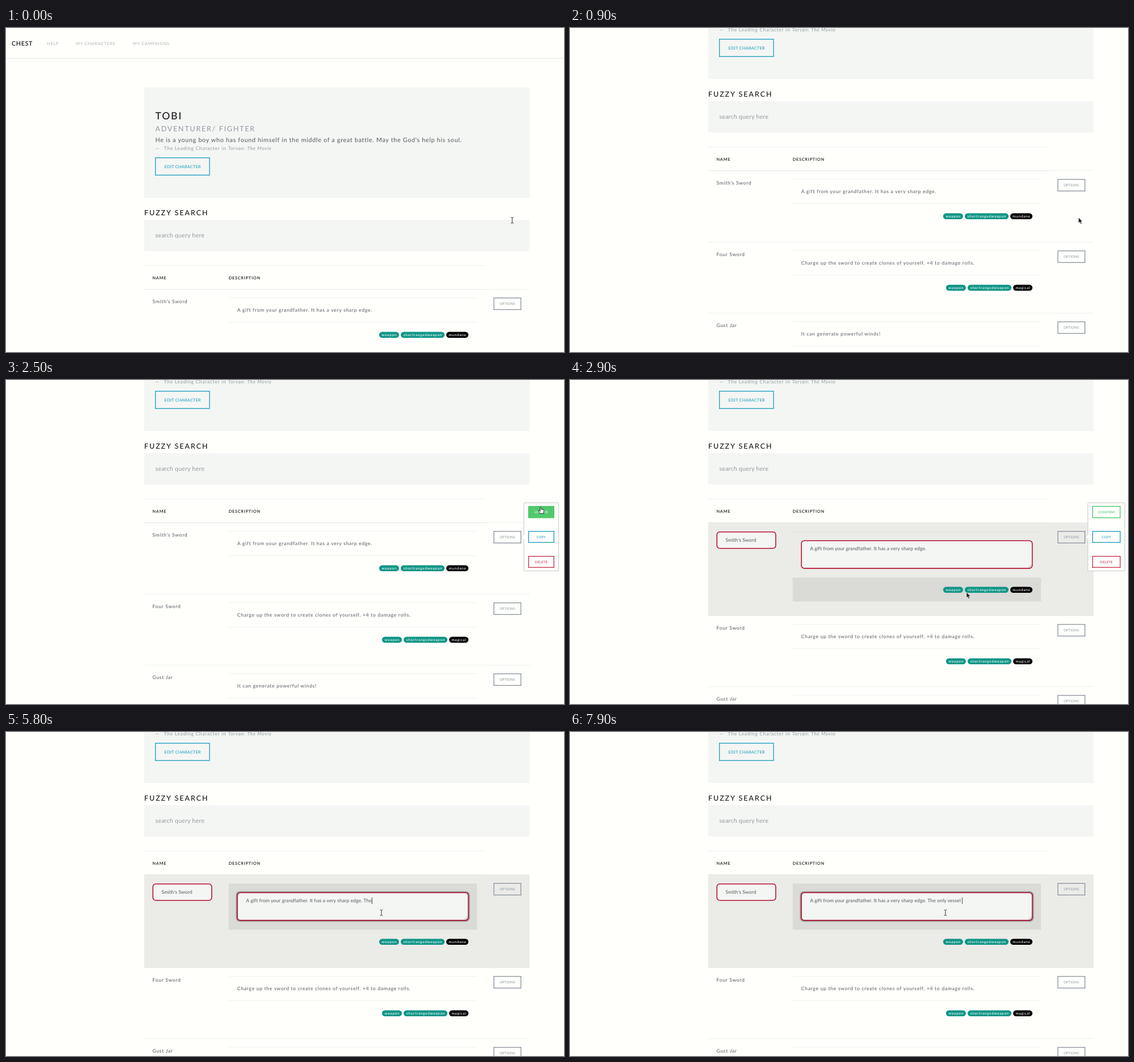
Recreate the animation shown at these times as an HTML page. Size 981x571 px, loop 8 s.

```html
<!DOCTYPE html>
<html lang="en">
<head>
<meta charset="utf-8">
<title>Character inventory</title>
<style>
  html, body { margin: 0; width: 100%; height: 100%; overflow: hidden; background: #fffffc; }
  svg { display: block; width: 981px; height: 571px; font-family: Lato, "Open Sans", sans-serif; }
  text { white-space: pre; text-rendering: geometricPrecision; fill: #55595c; }
  .brand { font-size: 10.7px; letter-spacing: .7px; font-weight: 600; fill: #1a1a1a; }
  .nav { font-size: 7.4px; letter-spacing: .7px; fill: #b0b1b0; }
  .title { font-size: 17.5px; letter-spacing: 1.83px; font-weight: 500; fill: #1a1a1a; }
  .head { font-size: 12.6px; letter-spacing: 1.87px; font-weight: 500; fill: #1a1a1a; }
  .sub { font-size: 12.6px; letter-spacing: 1.68px; fill: #919aa1; }
  .lead { font-size: 10.8px; letter-spacing: .66px; }
  .foot { font-size: 8.6px; letter-spacing: .67px; fill: #919aa1; }
  .hint { font-size: 10.7px; letter-spacing: .18px; fill: #949b9f; }
  .th { font-size: 7.3px; letter-spacing: .76px; font-weight: 600; fill: #1a1a1a; }
  .td { font-size: 8.6px; letter-spacing: .68px; }
  .input { font-size: 8.6px; letter-spacing: .08px; }
  .tag { font-size: 6.4px; letter-spacing: .7px; font-weight: 500; fill: #fff; text-anchor: middle; }
  .btn { font-size: 7.4px; letter-spacing: .2px; font-weight: 500; }
  .small { font-size: 6px; letter-spacing: .12px; font-weight: 500; text-anchor: middle; }
</style>
</head>
<body>
<svg id="stage" viewBox="0 0 981 571" xmlns="http://www.w3.org/2000/svg"></svg>
<script>
const stage = document.getElementById('stage');
const PANEL = '#f4f6f4', LINE = '#f0f1ef', GRAY = '#919aa1', TEAL = '#0f9587';
const BLUE = '#27a3c0', GREEN = '#50c96d', RED = '#c93a54', BORDER = '#b5102c';
const LOOP = 8000;

function el(tag, attrs, parent, content) {
  const node = document.createElementNS('http://www.w3.org/2000/svg', tag);
  for (const k in attrs) node.setAttribute(k, attrs[k]);
  if (content) node.textContent = content;
  parent.appendChild(node);
  return node;
}
const group = (parent, x = 0, y = 0) => el('g', { transform: `translate(${x} ${y})` }, parent);
const text = (p, cls, x, y, s) => el('text', { class: cls, x, y }, p, s);
const box = (p, x1, y1, x2, y2, fill, more) =>
  el('rect', { x: x1, y: y1, width: x2 - x1, height: y2 - y1, fill, ...more }, p);
const line = (p, x1, x2, y, color = LINE) => box(p, x1, y - .5, x2, y + .5, color);
const show = (node, on) => node.setAttribute('visibility', on ? 'inherit' : 'hidden');
const move = (node, x, y) => node.setAttribute('transform', `translate(${x} ${y})`);

function button(p, x1, y1, x2, y2, color, label) {
  const face = box(p, x1 + .7, y1 + .7, x2 - .7, y2 - .7, 'none',
    { stroke: color, 'stroke-width': 1.4 });
  const caption = text(p, 'small', (x1 + x2) / 2, (y1 + y2) / 2 + 2, label);
  caption.style.fill = color;
  return (on, fill = color) => {
    face.setAttribute('fill', on ? fill : 'none');
    face.setAttribute('stroke', on ? fill : color);
    caption.style.fill = on ? '#f8faf8' : color;
  };
}

function tags(p, y, list) {
  const g = group(p, 0, y);
  for (const [x1, x2, label, color] of list) {
    box(g, x1, 0, x2, 10.5, color, { rx: 5.25 });
    text(g, 'tag', (x1 + x2) / 2 + .4, 7.9, label);
  }
  return g;
}

function row(p, y, name, about, list) {
  const g = group(p, 0, y);
  const back = box(g, 243, 0, 920.5, 126, 'none');
  line(g, 243, 920.5, -.5, '#edefed');
  const view = group(g);
  text(view, 'td', 257.5, 24.2, name);
  line(view, 391.5, 828, 14.5);
  line(view, 391.5, 828, 57.5);
  text(view, 'td', 406.5, 39.4, about);
  const edit = group(g);
  const badges = tags(g, 74.5, list);
  const hover = button(g, 857, 14, 906, 36, GRAY, 'OPTIONS');
  return { g, back, view, edit, badges, hover };
}

// Page
const page = group(stage);
line(page, 0, 981, 53.5, '#e7e9e8');
text(page, 'brand', 10, 30.8, 'CHEST');
text(page, 'nav', 72, 29.6, 'HELP');
text(page, 'nav', 122.8, 29.6, 'MY CHARACTERS');
text(page, 'nav', 223, 29.6, 'MY CAMPAIGNS');

box(page, 243, 105, 920.5, 299, PANEL);
text(page, 'title', 262.5, 161, 'TOBI');
text(page, 'sub', 262.5, 181.6, 'ADVENTURER/ FIGHTER');
text(page, 'lead', 262.5, 201.4, "He is a young boy who has found himself in the middle of a great battle. May the God's help his soul.");
text(page, 'foot', 262.5, 215, '—');
text(page, 'foot', 277.5, 215, 'The Leading Character in');
text(page, 'foot', 390.5, 215, 'Torvan: The Movie').setAttribute('font-style', 'italic');
box(page, 262.7, 228.7, 357.8, 259.3, 'none', { stroke: BLUE, 'stroke-width': 1.4 });
text(page, 'btn', 278.5, 246.7, 'EDIT CHARACTER').style.fill = BLUE;

text(page, 'head', 243, 330.4, 'FUZZY SEARCH');
box(page, 243, 338, 920.5, 393, PANEL);
text(page, 'hint', 262.5, 369.2, 'search query here');

line(page, 243, 843, 418.5);
text(page, 'th', 257.5, 442.5, 'NAME');
text(page, 'th', 391.5, 442.5, 'DESCRIPTION');

const lower = group(page);
row(lower, 712, 'Gust Jar', 'It can generate powerful winds!', []);
row(lower, 587, 'Four Sword', 'Charge up the sword to create clones of yourself. +4 to damage rolls.', [
  [661, 696, 'weapon', TEAL], [699, 776, 'shortrangedweapon', TEAL], [779, 813, 'magical', '#000']]);
const first = row(page, 461, "Smith's Sword", 'A gift from your grandfather. It has a very sharp edge.', [
  [656, 691, 'weapon', TEAL], [694, 771, 'shortrangedweapon', TEAL], [774, 813, 'mundane', '#000']]);
line(page, 243, 843, 460.5, '#e6e8e7');

// Edit form of the first row
const form = first.edit;
line(form, 391.5, 828, 15.3, '#e2e3e0');
const cellTop = box(form, 391.5, 15.3, 828, 96.5, '#dadad7');
const cellTags = box(form, 391.5, 96.3, 828, 138.5, '#dadad7');
const ring = box(form, 405.2, 29.8, 814.3, 81.2, 'none', { rx: 6, stroke: '#8f8f90', 'stroke-width': 2 });
const field = { rx: 5, stroke: BORDER, 'stroke-width': 1.6 };
box(form, 258.3, 15.8, 361.7, 44.7, PANEL, field);
text(form, 'input', 273.5, 33, "Smith's Sword");
box(form, 406.8, 31.2, 812.7, 79.9, PANEL, field);
el('path', { d: 'M806 78.5l5.5-5.5M809 78.5l2.5-2.5', stroke: '#888', 'stroke-width': .8 }, form);
const typed = text(form, 'input', 422, 48, ' ');
const caret = box(form, 0, 39.5, .9, 51, '#3c3f42');

// Popovers
function popover(label, right) {
  const g = group(stage);
  box(g, 910.5, 216.5, right, 336.5, '#fffffd', { stroke: '#cbcccb', 'stroke-width': 1, rx: .5 });
  el('path', { d: 'M911 271.5L906.5 277L911 282.5', fill: '#fffffd', stroke: '#d2d3d2', 'stroke-width': .8 }, g);
  const end = right - 7.5;
  const hover = button(g, 918, 222, end, 243.5, GREEN, label);
  button(g, 918, 266, end, 287, BLUE, 'COPY');
  button(g, 918, 310, end, 331, RED, 'DELETE');
  return { g, hover };
}
const menu = popover('UPDATE', 971.5);
const confirmMenu = popover('CONFIRM', 975.5);

// Pointers, each drawn around its hot spot
const pointers = { beam: group(stage), arrow: group(stage), hand: group(stage) };
el('path', { d: 'M-2.4-5Q-.3-5 0-4Q.3-5 2.4-5M0-4.5V4.5M-2.4 5Q-.3 5 0 4Q.3 5 2.4 5', fill: 'none', stroke: '#333', 'stroke-width': 1 }, pointers.beam);
el('path', { d: 'M0 0V10L2.3 7.9L4 11.6L5.8 10.8L4.2 7.2H7.2Z', fill: '#222', stroke: '#fff', 'stroke-width': .6 }, pointers.arrow);
el('path', { d: 'M-1 .8Q0-.6 1 .8V4.2L4.8 5Q6 5.4 5.8 7L5 11.8H-1.2L-4 7.6Q-4.4 6.2-3 6.4L-1 8Z', fill: '#fff', stroke: '#222', 'stroke-width': 1, 'stroke-linejoin': 'round' }, pointers.hand);

// Timelines: each entry holds until the next
const scrolls = [[0, 0], [400, 18], [500, 48], [600, 81], [700, 115], [800, 166], [900, 209]];
const cursor = [
  [0, 'beam', 890, 339], [100, 'beam', 892, 340], [200, 'arrow', 894, 334],
  [1100, 'arrow', 894, 318], [1200, 'arrow', 893, 296], [1300, 'hand', 892.5, 272],
  [1800, 'arrow', 914, 258], [1900, 'hand', 936, 232], [2100, 'hand', 938, 226], [2200, 'hand', 940, 223.5],
  [2800, 'arrow', 846, 292], [2900, 'arrow', 697, 374], [3000, 'arrow', 684, 366],
  [3200, 'beam', 668, 328], [3300, 'beam', 660, 318.5]
];
const BASE = 'A gift from your grandfather. It has a very sharp edge.';
const typing = [
  [0, ''], [4000, ' '], [4300, ' T'], [4400, ' Th'], [4500, ' The'], [4600, ' Then'],
  [5100, ' The'], [5200, ' Th'], [5300, ' T'], [5600, ' Th'], [5800, ' The'],
  [6100, ' The o'], [6300, ' The on'], [6400, ' The only'], [6600, ' The only '],
  [6900, ' The only v'], [7200, ' The only ve'], [7300, ' The only ves'], [7400, ' The only vess'],
  [7600, ' The only vesse'], [7900, ' The only vessel ']
];
const at = (steps, t) => steps.filter(s => s[0] <= t).pop();
const within = (t, a, b) => t >= a && t < b;

function render(t) {
  move(page, 0, -at(scrolls, t)[1]);

  const editing = t >= 2600;
  const hovered = within(t, 1100, 1800) || t >= 2800;
  first.back.setAttribute('fill', hovered ? '#ebebe8' : 'none');
  first.back.setAttribute('height', editing ? 164 : 126);
  show(first.view, !editing);
  show(form, editing);
  move(first.badges, 0, editing ? 112.5 : 74.5);
  move(lower, 0, editing ? 38 : 0);
  first.hover(within(t, 1300, 1800), '#cdd1d6');

  show(cellTags, within(t, 2900, 3200));
  show(cellTop, t >= 3200);
  show(ring, t >= 3400);

  typed.textContent = BASE + at(typing, t)[1];
  caret.setAttribute('x', 422 + typed.getComputedTextLength());
  show(caret, t >= 3400 && !within(t, 4900, 5100));

  show(menu.g, within(t, 1400, 2600));
  menu.hover(t >= 1900);
  show(confirmMenu.g, within(t, 2600, 3600));
  confirmMenu.hover(t < 2800);
  confirmMenu.g.setAttribute('opacity', t < 3400 ? 1 : t < 3500 ? .6 : .2);

  const [, kind, x, y] = at(cursor, t);
  for (const k in pointers) show(pointers[k], k === kind);
  move(pointers[kind], x, y);
}

const start = performance.now();
function tick() {
  render((performance.now() - start) % LOOP);
  requestAnimationFrame(tick);
}
tick();
</script>
</body>
</html>
```
